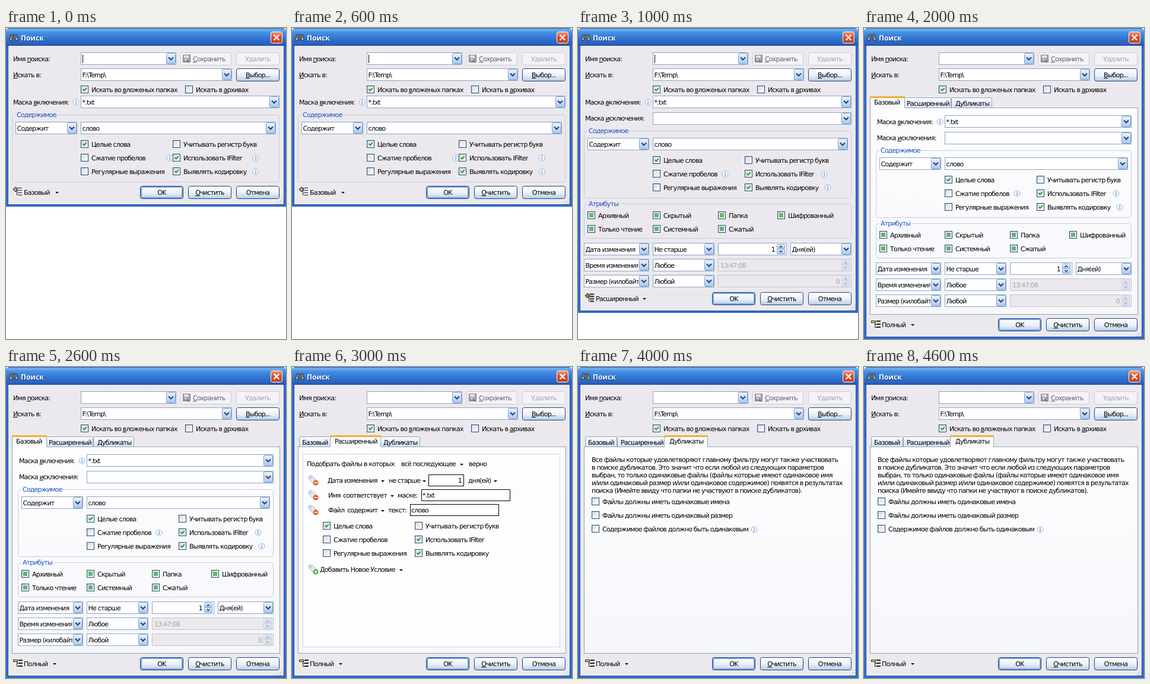
Recreate the animation shown at these times as an HTML page. Size 472 by 524 pixels, loop 5000 ms.

```html
<!DOCTYPE html>
<html lang="ru">
<head>
<meta charset="utf-8">
<title>Поиск</title>
<style>
html, body { margin: 0; width: 100%; height: 100%; overflow: hidden; background: #fff; }
svg { display: block; font: 11px "DejaVu Sans", sans-serif; letter-spacing: -.8px; text-rendering: geometricPrecision; }
.u { text-decoration: underline; }
.title { font: bold 12px "Noto Sans", sans-serif; letter-spacing: 0; }
</style>
</head>
<body>
<svg width="472" height="524" viewBox="0 0 472 524">
  <defs>
    <linearGradient id="bar" x2="0" y2="1">
      <stop stop-color="#2c60b4"/><stop offset=".08" stop-color="#78b2f2"/><stop offset=".25" stop-color="#4590e4"/>
      <stop offset=".6" stop-color="#2f74d2"/><stop offset=".9" stop-color="#2b60bc"/><stop offset="1" stop-color="#2450a4"/>
    </linearGradient>
    <linearGradient id="btn" x2="0" y2="1">
      <stop stop-color="#fff"/><stop offset=".55" stop-color="#eaf0f9"/><stop offset="1" stop-color="#b4cae8"/>
    </linearGradient>
    <linearGradient id="drop" x2="0" y2="1">
      <stop stop-color="#eef4fd"/><stop offset="1" stop-color="#a9c6ee"/>
    </linearGradient>
    <linearGradient id="close" x2="0" y2="1">
      <stop stop-color="#f09a80"/><stop offset=".5" stop-color="#dc4a26"/><stop offset="1" stop-color="#c8401c"/>
    </linearGradient>
    <linearGradient id="check" x2="1" y2="1">
      <stop stop-color="#d8d8dc"/><stop offset="1" stop-color="#fff"/>
    </linearGradient>
    <linearGradient id="tab" x2="0" y2="1">
      <stop stop-color="#fbfcfe"/><stop offset="1" stop-color="#d3e0f2"/>
    </linearGradient>
    <linearGradient id="page" x2="0" y2="1">
      <stop stop-color="#fdfdfe"/><stop offset="1" stop-color="#f6f7fb"/>
    </linearGradient>
  </defs>
  <g id="view"></g>
</svg>
<script>
const FACE = '#ebe9ed', PAGE = '#fcfcfe', BLUE = '#1f4fc4', GRAY = '#a5a3a8';
const EDGE = '#8fa6c0', KNOB = '#7a9fd2', INK = '#1f3f78';
const view = document.getElementById('view');

// An underscore marks the underlined access key.
const text = (x, y, s, fill = '#000', extra = '') =>
  `<text x="${x}" y="${y}" fill="${fill}" ${extra}>${s.replace(/_(.)/, '<tspan class="u">$1</tspan>')}</text>`;
const middle = 'text-anchor="middle"', end = 'text-anchor="end"';
const box = (x, y, w, h, fill, stroke, r = 0) => stroke
  ? `<rect x="${x + .5}" y="${y + .5}" width="${w - 1}" height="${h - 1}" rx="${r}" fill="${fill}" stroke="${stroke}"/>`
  : `<rect x="${x}" y="${y}" width="${w}" height="${h}" rx="${r}" fill="${fill}"/>`;
const path = (d, stroke, w = 1, fill = 'none') =>
  `<path d="${d}" stroke="${stroke}" stroke-width="${w}" fill="${fill}"/>`;
const arrow = (x, y) => path(`M${x - 3} ${y - 1}h6l-3 3z`, 'none', 0, '#000');
const info = (x, y) => `<circle cx="${x}" cy="${y}" r="5" fill="#f4f8ff" stroke="#94b8e6"/>`
  + box(x - .5, y - 3, 1.2, 1.5, '#3a78cc') + box(x - .5, y - .5, 1.2, 3.5, '#3a78cc');

function combo(x, y, right, label = '') {
  const b = right - 17;
  return box(x, y, right - x, 21, '#fff', EDGE)
    + `<svg x="${x}" y="${y}" width="${b - x - 1}" height="21">${text(2.5, 15, label)}</svg>`
    + box(b, y + 1, 16, 19, 'url(#drop)', KNOB, 2)
    + path(`M${b + 4} ${y + 8.5}l4 4l4 -4`, INK, 2);
}

function spin(x, y, right, label, off, left) {
  const b = right - 17;
  const knobs = [2, 10].map(d => box(b, y + d, 14, 9, 'url(#drop)', KNOB, 1)).join('')
    + path(`M${b + 4.5} ${y + 8}l2.5 -2.5l2.5 2.5M${b + 4.5} ${y + 13}l2.5 2.5l2.5 -2.5`, INK, 1.5);
  return box(x, y, right - x, 21, off ? FACE : '#fff', off ? '#c6c4ca' : EDGE)
    + text(left ? x + 4 : b - 3, y + 15, label, off ? GRAY : '#000', left ? '' : end)
    + `<g opacity="${off ? .35 : 1}">${knobs}</g>`;
}

// kind: 0 empty, 1 ticked, 2 mixed
function check(x, cy, label, kind = 0) {
  const y = cy - 7;
  return box(x, y, 13, 13, 'url(#check)', '#1f4a7c')
    + (kind == 1 ? path(`M${x + 3.5} ${y + 6}l2.3 2.6l4 -4.6`, '#21a121', 2) : '')
    + (kind == 2 ? box(x + 3, y + 3, 7, 7, '#62b862') : '')
    + text(x + 18, cy + 4, label);
}

function button(x, y, w, label, style = '') {
  const off = style == 'off';
  return box(x, y, w, 22, off ? '#f3f2f5' : 'url(#btn)', off ? '#cfcdd3' : '#1f4478', 3)
    + (style == 'main' ? `<rect x="${x + 2}" y="${y + 2}" width="${w - 4}" height="18" rx="2" fill="none" stroke="#74a0e6" stroke-width="2"/>` : '')
    + text(x + w / 2, y + 15, label, off ? GRAY : '#000', middle);
}

const group = (x, y, right, h, label, w, bg) =>
  box(x, y, right - x, h, 'none', '#c8ccd6', 4) + box(x + 6, y - 2, w, 5, bg) + text(x + 8, y + 4, label, BLUE);

function options(x, cy) {
  return check(x, cy, 'Целые слова', 1) + check(x + 155, cy, 'Учитывать регистр букв')
    + check(x, cy + 23, 'Сжатие пробелов') + check(x + 155, cy + 23, 'Использовать IFilter', 1)
    + check(x, cy + 46, 'Регулярные выражения') + check(x + 155, cy + 46, 'Выявлять кодировку', 1);
}

const mask = (x, y, right) => text(x + 12, y + 15, 'Маска _включения:') + info(x + 118, y + 11) + combo(x + 126, y, right, '*.txt');

function content(x, y, right, bg, infos) {
  return group(x + 10, y, right, 114, 'Содержимое', 68, bg)
    + combo(x + 16, y + 12, x + 120, 'Содержит') + combo(x + 126, y + 12, right - 6, 'слово')
    + options(x + 126, y + 50)
    + info(x + infos[0], y + 73) + info(x + infos[1], y + 73) + info(x + 421, y + 96);
}

// All plain filters, used in the tall dialog and on the first tab.
function filters(x, y, right, bg) {
  const attrs = [['Архивный', 'Скрытый', 'Папка', 'Шифрованный'], ['Только чтение', 'Системный', 'Сжатый']];
  const cols = [16, 126, 236, 336];
  const rows = [['Дата изменения', 'Не старше'], ['Время изменения', 'Любое'], ['Размер (килобайты)', 'Любой']];
  const split = x ? 351 : 352;
  return mask(x, y + 114, right) + text(x + 12, y + 156, 'Маска _исключения:') + combo(x + 126, y + 142, right)
    + content(x, y + 173, right, bg, [248, 415])
    + group(x + 10, y + 296, right, 59, 'Атрибуты', 55, bg)
    + attrs.map((r, j) => r.map((s, i) => check(x + cols[i], y + 316 + 23 * j, s, 2)).join('')).join('')
    + rows.map((r, i) => combo(x + 10, y + 362 + 27 * i, x + 120, r[0]) + combo(x + 126, y + 362 + 27 * i, x + 230, r[1])).join('')
    + spin(x + 236, y + 362, split, '1') + combo(split + 6, y + 362, right, 'Дня(ей)')
    + spin(x + 236, y + 389, right, '13:47:08', true, true) + spin(x + 236, y + 416, right, '0', true);
}

function modeIcon(y, mode) {
  const ink = '#222', bar = mode ? '#f4d838' : '#fff';
  if (mode == 2)
    return box(12, y + 2, 8, 4, bar, ink) + path(`M18.5 ${y + 6}v7.5h3M18.5 ${y + 8.5}h3`, ink)
      + [3, 8, 13].map(d => path(`M21 ${y + d}h7`, ink, 2)).join('');
  return [0, 4, 8, 12].map(d => path(`M20 ${y + 1.5 + d}h7`, ink, mode ? 2 : 1)).join('')
    + path(`M18.5 ${y + 1}v13`, ink)
    + path(`M16 ${y}v8M12 ${y + 4}h8`, ink, 3) + path(`M16 ${y + 1}v6M13 ${y + 4}h6`, bar);
}

function dialog(h, mode, caret) {
  const name = ['Базовый', 'Расширенный', 'Полный'][mode], y = h - 35;
  let grip = '';
  for (let i = 0; i < 3; i++) for (let j = 0; j <= i; j++)
    grip += box(466 - 4 * j, h - 14 + 4 * i, 2, 2, '#c9c7cf');
  return path(`M0 ${h}V7Q0 0 7 0H465Q472 0 472 7V${h}z`, 'none', 0, '#2a5cb8')
    + path(`M1.5 30V${h - 1.5}H470.5V30`, '#3f7fd8')
    + path('M0 30V7Q0 0 7 0H465Q472 0 472 7V30z', 'none', 0, 'url(#bar)')
    + box(4, 30, 464, h - 34, FACE)
    + path('M8 11h4v3h2v-3h4l2 6v4h-5v-4h-4v4h-5v-4z', '#3a404a', 1, '#6d737d') + path('M8 17v3M18 17v3', '#b9bfc8', 2)
    + text(26, 22, 'Поиск', '#1c448c', 'class="title"') + text(25, 21, 'Поиск', '#fff', 'class="title"')
    + box(446, 6, 20, 20, 'url(#close)', '#fff', 3) + path('M451.5 11.5l9 9M460.5 11.5l-9 9', '#fff', 2.4)
    + text(12, 56, 'Имя _поиска:') + combo(126, 41, 287) + (caret ? box(129, 45, 1, 14, '#000') : '')
    + button(294, 41, 86, '', 'off') + text(315, 56, '_Сохранить', '#66646a')
    + box(298, 45, 13, 13, '#a3a1a6', '#858388') + box(300, 46, 8, 5, '#e2e0e4')
    + path('M302 53l7 5', '#77757a', 2) + '<circle cx="303" cy="53" r="2.5" fill="#e2e0e4" stroke="#77757a"/>'
    + button(388, 41, 73, 'Удалить', 'off')
    + text(12, 83, '_Искать в:') + combo(126, 68, 381, 'F:\\Temp\\') + button(388, 68, 73, '_Выбор...')
    + check(126, 104, 'Искать во _вложеных папках', 1) + check(302, 104, 'Искать в _архивах')
    + modeIcon(h - 33, mode) + text(30, h - 20, name) + arrow([86, 112, 82][mode], h - 24)
    + button(226, y, 73, 'OK', 'main') + button(307, y, 73, '_Очистить') + button(388, y, 73, 'Отмена') + grip;
}

function tabs(active) {
  const list = [['Базовый', 12, 66, 17], ['Расширенный', 66, 147, 72], ['Дубликаты', 147, 216, 154]];
  const tab = ([s, l, r, x], on) => {
    const a = on ? l - 2 : l, b = on ? r + 3 : r, top = on ? 115 : 117;
    return path(`M${a + .5} 135V${top + 2.5}q0 -2 2 -2H${b - 2.5}q2 0 2 2V135`, '#91a7b4', 1, on ? PAGE : 'url(#tab)')
      + (on ? box(a, 115, b - a, 3, '#f0b030', '', 1) + box(a + 1, 134, b - a - 2, 2, PAGE) : '')
      + text(x, on ? 129 : 131, s);
  };
  return list.map((t, i) => i == active ? '' : tab(t)).join('')
    + box(10, 134, 452, 349, 'url(#page)', '#91a7b4') + tab(list[active], true);
}

function tag(y, plus) {
  return path(`M28.5 ${y - 7}l5 -1l9 9l-5 6l-9 -9z`, '#9db9d8', 1, '#dfeaf6')
    + `<circle cx="31.5" cy="${y - 4.5}" r="1.2" fill="#fff" stroke="#8aa6c6"/>`
    + `<circle cx="40" cy="${y + 4}" r="4.5" fill="${plus ? '#58ac3c' : '#e8602c'}"/>`
    + path(`M37.5 ${y + 4}h5` + (plus ? `M40 ${y + 1.5}v5` : ''), '#fff', 1.6);
}

function rules() {
  const words = [
    [25, 167, 'Подобрать файлы в которых'], [184, 167, 'всё последующее'], [298, 167, 'верно'],
    [60, 195, 'Дата изменения'], [163, 195, 'не старше'], [297, 195, 'дня(ей)'],
    [61, 220, 'Имя'], [86, 220, 'соответствует'], [178, 220, 'маске:'],
    [61, 245, 'Файл'], [93, 245, 'содержит'], [162, 245, 'текст:'], [47, 345, 'Добавить Новое Условие']];
  const arrows = [[286, 164], [153, 192], [223, 192], [343, 192], [169, 217], [153, 242], [184, 342]];
  return box(18, 146, 434, 326, '#fdfdfe', '#d5d8e0')
    + words.map(w => text(...w)).join('') + arrows.map(a => arrow(...a)).join('')
    + [191, 216, 241].map(y => tag(y)).join('') + tag(341, true)
    + box(230, 181, 60, 20, '#fff', '#000') + text(286, 195, '1', '#000', end)
    + box(218, 206, 150, 20, '#fff', '#000') + text(220, 220, '*.txt')
    + box(199, 231, 150, 20, '#fff', '#000') + text(201, 245, 'слово')
    + options(52, 268);
}

function duplicates() {
  const lines = ['Все файлы которые удовлетворяют главному фильтру могут также участвовать',
    'в поиске дубликатов. Это значит что если любой из следующих параметров',
    'выбран, то только одинаковые файлы (файлы которые имеют одинаковое имя',
    'и/или одинаковый размер и/или одинаковое содержимое) появятся в результатах',
    'поиска (Имейте ввиду что папки не участвуют в поиске дубликатов).'];
  return lines.map((s, i) => text(23, 160 + 13 * i, s)).join('')
    + ['Файлы должны иметь одинаковые имена', 'Файлы должны иметь одинаковый размер',
      'Содержимое файлов должно быть одинаковым'].map((s, i) => check(23, 227 + 23 * i, s)).join('')
    + info(297, 274);
}

const scenes = [
  dialog(301, 0, true) + mask(0, 114, 461) + content(0, 146, 461, FACE, [276, 421]),
  dialog(480, 1, true) + filters(0, 0, 461, FACE),
  dialog(524, 2) + tabs(0) + filters(10, 33, 451, PAGE),
  dialog(524, 2) + tabs(1) + rules(),
  dialog(524, 2) + tabs(2) + duplicates()
];

let shown = -1;
function tick() {
  const i = Math.floor(performance.now() / 1000) % scenes.length;
  if (i != shown) view.innerHTML = scenes[shown = i];
  requestAnimationFrame(tick);
}
tick();
</script>
</body>
</html>
```
